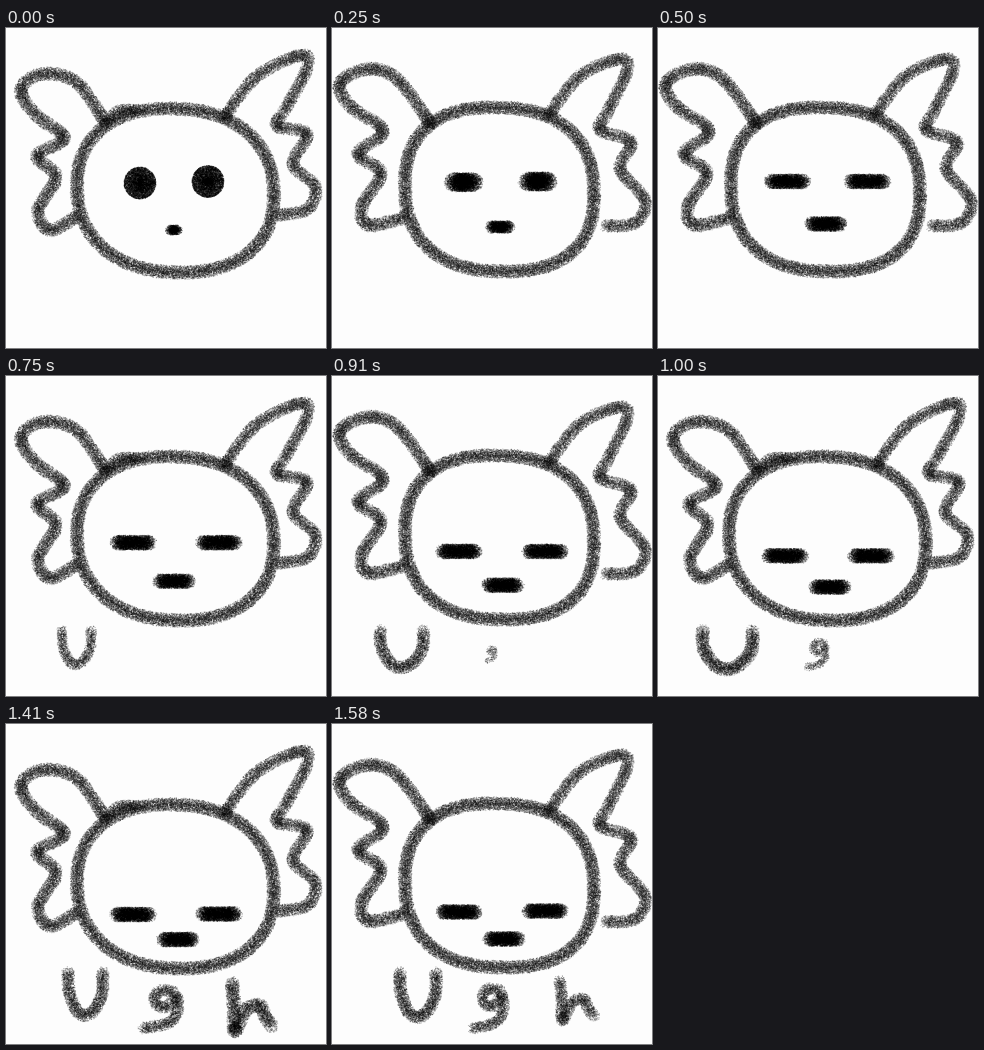
These frames come from a looping animation (320 by 320 pixels, 10 s). An HTML page with a canvas:

```html
<!DOCTYPE html>
<html lang="en">
<head>
<meta charset="utf-8">
<title>Ugh</title>
<style>
html, body { margin: 0; width: 100%; height: 100%; overflow: hidden; background: #fdfdfd; }
canvas { display: block; width: 100vw; height: 100vh; }
</style>
</head>
<body>
<canvas id="stage" width="320" height="320"></canvas>
<script>
const SIZE = 320, LOOP = 10000, FPS = 12, LAST = 19;
const PAPER = '#fdfdfd', INK = 'rgba(0,0,0,.3)';
const stage = document.getElementById('stage').getContext('2d');

let seed = 1;
function rnd() {
  seed = (seed + 0x6D2B79F5) | 0;
  let t = Math.imul(seed ^ (seed >>> 15), 1 | seed);
  t = (t + Math.imul(t ^ (t >>> 7), 61 | t)) ^ t;
  return ((t ^ (t >>> 14)) >>> 0) / 4294967296;
}

const clamp = u => Math.max(0, Math.min(1, u));
const ramp = (step, from, to) => clamp((step - from) / (to - from));
const points = s => s.split(' ').map(p => p.split(',').map(Number));

function layer() {
  const c = document.createElement('canvas');
  c.width = c.height = SIZE;
  const g = c.getContext('2d');
  g.fillStyle = INK;
  return g;
}

// One grain, thrown from a round brush that is denser in its middle
function grain(g, x, y, r) {
  const a = rnd() * Math.PI * 2, d = r * rnd() ** .6;
  g.fillRect(x + d * Math.cos(a) - .5, y + d * Math.sin(a) - .5, 1, 1);
}

// Catmull-Rom stroke; larger brushes also press harder
function spray(g, pts, r) {
  const at = i => pts[clamp(i / (pts.length - 1)) * (pts.length - 1)];
  for (let i = 0; i < pts.length - 1; i++) {
    const [a, b, c, d] = [at(i - 1), at(i), at(i + 1), at(i + 2)];
    const mix = (k, u) => b[k] + u * (c[k] - a[k] + u * (2 * a[k] - 5 * b[k] + 4 * c[k] - d[k]
      + u * (3 * (b[k] - c[k]) + d[k] - a[k]))) / 2;
    const count = .85 * r * r * Math.hypot(c[0] - b[0], c[1] - b[1]);
    for (let n = 0; n < count; n++) {
      const u = n / count;
      grain(g, mix(0, u), mix(1, u), r);
    }
  }
}

// Solid capsule with a soft edge
function blob(g, x, y, rx, ry) {
  const w = Math.max(0, rx - ry);
  const count = 8 * (4 * w * ry + Math.PI * ry * ry);
  for (let n = 0; n < count; n++) grain(g, x + w * (rnd() * 2 - 1), y, ry);
}

function outline(cx, cy, rx, ry, power) {
  const bend = v => Math.sign(v) * Math.abs(v) ** (2 / power);
  return Array.from({ length: 41 }, (_, i) => {
    const a = i / 40 * Math.PI * 2;
    return [cx + rx * bend(Math.cos(a)), cy + ry * bend(Math.sin(a + .05))];
  });
}

const heads = [
  {
    face: outline(169.5, 162.5, 98.5, 82, 2.25),
    left: '98,92 70,54 36,46 15,62 30,87 58,110 31,128 50,149 32,182 44,202 70,189',
    right: '218,90 250,49 295,27 301,40 280,80 271,98 301,106 287,136 309,158 302,181 272,187',
    tuft: '99,97 112,83 132,82'
  },
  {
    face: outline(167.5, 161.5, 94.5, 82, 2.4),
    left: '98,95 65,51 36,41 8,55 18,78 51,103 26,126 49,145 30,178 36,197 72,190',
    right: '216,88 248,48 288,31 295,43 275,85 268,102 299,114 288,141 313,172 303,195 274,198',
    tuft: '97,97 102,94'
  }
].map(h => {
  const g = layer();
  spray(g, h.face, 7);
  spray(g, points(h.left), 6.9);
  spray(g, points(h.right), 6.6);
  spray(g, points(h.tuft), 6);
  return g.canvas;
});

// Shapes in a unit box; keys give step, centre and half size
const letters = [
  { shape: '-1,-1 -.95,-.1 -.5,.8 0,1 .5,.75 .95,0 1,-1',
    keys: '9,70.5,271.5,14.5,17 12,69.5,274,25,19 15,73,268.5,16.5,21 19,86,271,18,22' },
  { shape: '.86,-.9 .07,-1 -.35,-.65 -.2,-.22 .36,-.12 .93,-.65 1,.07 .5,.7 -1,1',
    keys: '12,158.5,278.5,9,12.5 13,153,286,19,18 15,153,286,19,18 19,156,284.5,15,20' },
  { shape: '-1,-1 -.9,-.05 -.85,1 -.3,.1 .4,-.05 .65,.4 1,.8',
    keys: '15,246,270,6,8 17,246,283,20,24 19,245,276.5,17,19.5' }
].map(l => ({ shape: points(l.shape), keys: points(l.keys) }));

function blend(keys, step) {
  const i = Math.max(0, keys.findIndex(k => k[0] >= step));
  const b = keys[i], a = keys[Math.max(0, i - 1)];
  const u = a === b ? 0 : ramp(step, a[0], b[0]);
  return a.map((v, k) => v + (b[k] - v) * u);
}

function drawLetter(g, { shape, keys }, step) {
  const born = keys[0][0] - 1;
  if (step < born) return;
  const [, cx, cy, w, h] = blend(keys, step);
  const scale = step === born ? .5 : 1;
  const brush = 1.4 + .265 * scale * Math.sqrt(w * h);
  spray(g, shape.map(([x, y]) => [cx + x * w * scale, cy + y * h * scale]), brush);
}

// Round eyes squeeze into bars, sink, then lift a little
function drawFace(g, step) {
  const shut = ramp(step, 0, 6), sink = ramp(step, 6, 15);
  const part = ramp(step, 0, 9), lift = ramp(step, 15, 19);
  const rx = 16 + 8 * shut, ry = 7.5 + 8.5 * (1 - shut) ** 2;
  const eyeY = 153.5 + 39.5 * sink - 5 * lift;
  blob(g, 134 - 7 * part, eyeY + 1.5 * (1 - shut), rx, ry);
  blob(g, 202 + 11 * part, eyeY - lift, rx, ry);
  blob(g, 168 + 4 * ramp(step, 9, 12), 202 - 6 * shut + 20 * sink ** .7 - lift, 9 + 13 * shut, 5 + 2.5 * shut);
}

function render(step) {
  const g = layer();
  seed = 100 + step * 37;
  g.fillStyle = PAPER;
  g.fillRect(0, 0, SIZE, SIZE);
  g.drawImage(heads[(step >> 1) & 1], 0, 0);
  g.fillStyle = INK;
  drawFace(g, step);
  letters.forEach(l => drawLetter(g, l, step));
  return g.canvas;
}

const frames = [];
const start = performance.now();

function tick() {
  const t = (performance.now() - start) % LOOP;
  // Steps fall on whole hundredths of a second
  const step = Math.min(LAST, Math.floor((t + 7) * FPS / 1000));
  frames[step] = frames[step] || render(step);
  stage.drawImage(frames[step], 0, 0);
  requestAnimationFrame(tick);
}
tick();
</script>
</body>
</html>
```
